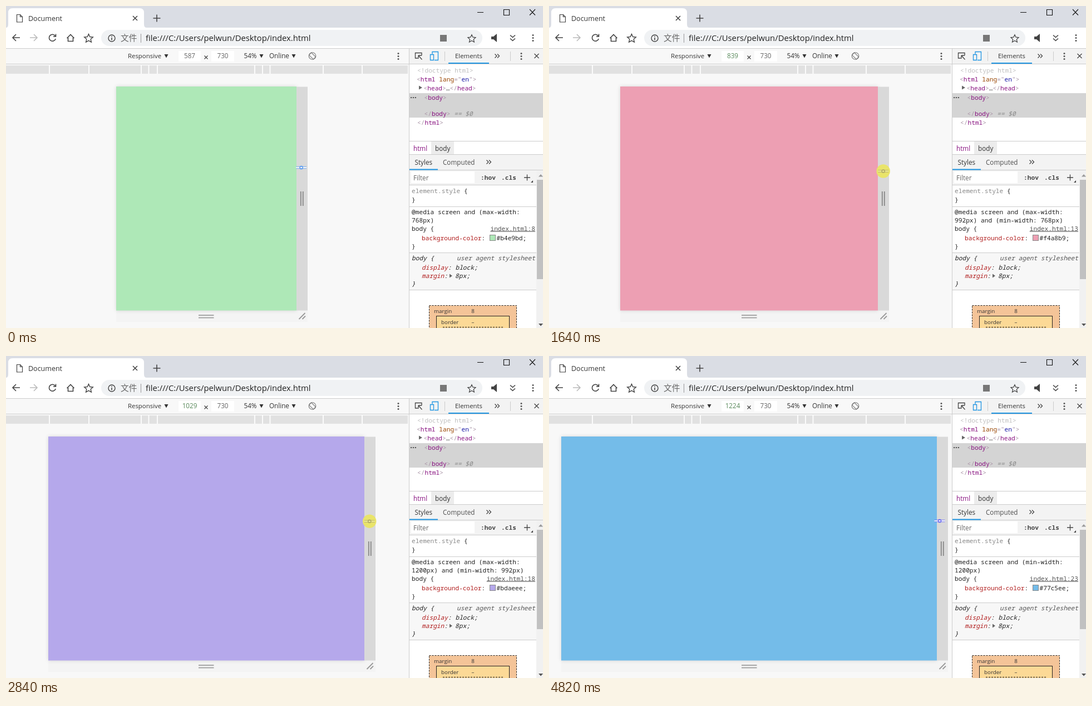
Write an HTML page that moves like this. It is 965 px wide and 580 px high and loops after 4940 ms.

```html
<!DOCTYPE html>
<html lang="en">
<head>
<meta charset="utf-8">
<title>Responsive preview</title>
<style>
html, body { margin: 0; width: 100%; height: 100%; overflow: hidden; background: #fff; }
svg { display: block; width: 965px; height: 580px; }
text { font: 11.7px "Open Sans", sans-serif; fill: #333; white-space: pre; }
.mono text { font: 11.2px "Noto Sans Mono", monospace; fill: #222; }
.mono .bracket { fill: #a894a6; }
.mono .tag { fill: #881280; }
.mono .prop { fill: #b01c1c; }
.mono .dim { fill: #888; }
.mono .ua text { font-style: italic; }
.mono .bold { font-weight: bold; fill: #444; }
.mono .link { text-anchor: end; text-decoration: underline; fill: #555; }
.small text { font-size: 9.8px; }
.mid { text-anchor: middle; }
.line { fill: none; stroke: #444; stroke-width: 1.6; }
.rule { fill: none; stroke: #ccc; }
</style>
</head>
<body>
<svg viewBox="0 0 965 580">
  <!-- window frame and tab -->
  <rect width="965" height="39" fill="#dadde4"/>
  <path d="M0 39q4 0 4-6V12q0-8 8-8H240q8 0 8 8V33q0 6 5 6z" fill="#fff"/>
  <text x="40" y="27" style="font-size:12.5px">Document</text>
  <path class="line" style="stroke-width:1.2" d="M19.500 15.500h6l4 4v9.500h-10zM25.500 15.500v4h4"/>
  <path class="line" d="M228 18l8 8m0-8l-8 8M264.500 22h13m-6.500-6.500v13"/>
  <path class="line" style="stroke:#111;stroke-width:1.1" d="M847 11.500h11M894.500 6.500h10v10h-10zM941 6l10 10.500m0-10.500l-10 10.500"/>

  <!-- address bar -->
  <rect y="39" width="965" height="37" fill="#fff"/>
  <rect x="171" y="43" width="685" height="29" rx="14.500" fill="#f0f2f4"/>
  <g class="line">
    <path d="M25 57H12m6-6l-6 6 6 6"/>
    <path d="M43 57h13m-6-6l6 6-6 6" stroke="#bbb"/>
    <path d="M88.500 54a6 6 0 1 0 .7 5M89.500 50.500v4.500h-4.500"/>
    <path d="M109.500 58l6.500-6.500 6.500 6.500M111.500 57v6.500h9V57"/>
    <path id="star" d="M148.500 50.500l2.300 5 5.500.6-4.100 3.700 1.200 5.400-4.900-2.800-4.900 2.800 1.200-5.400-4.100-3.700 5.500-.6z" stroke-width="1.4"/>
    <use href="#star" transform="translate(703.300 6.300) scale(.9)"/>
    <circle cx="190" cy="58" r="6" stroke-width="1.4"/>
    <path d="M190 57v4.500M190 54v1.600"/>
    <path d="M242.500 50v16" stroke="#999" stroke-width="1"/>
    <path d="M906 52.500l4.500 4 4.500-4M906 58.500l4.500 4 4.500-4"/>
  </g>
  <rect x="780" y="52" width="12" height="12" fill="#777"/>
  <path d="M872 55h4l6-5v15l-6-5h-4z" fill="#444"/>
  <text x="206" y="63" style="font:14.7px 'Noto Sans CJK SC','Noto Sans CJK',sans-serif;fill:#666">文件</text>
  <text x="251" y="63" style="font-size:14.8px;fill:#222">file:///C:/Users/pelwun/Desktop/index.html</text>

  <!-- device toolbar and ruler -->
  <rect y="76" width="965" height="504" fill="#f8f8f8"/>
  <path d="M310 81h40v19h-40zM369 81h41v19h-41z" fill="#fff"/>
  <text x="219" y="94" style="font-size:11.4px">Responsive</text>
  <text class="mid" id="size" x="330" y="94"></text>
  <text class="mid" x="389.500" y="94" fill-opacity=".75">730</text>
  <text x="427.500" y="94">54%</text>
  <text x="473" y="94">Online</text>
  <path d="M284.500 87h7l-3.500 6.500zM455.500 87h7l-3.500 6.500zM513.500 87h7l-3.500 6.500z" fill="#333"/>
  <path class="line" style="stroke-width:1.2" d="M356.500 89.500l6 6m0-6l-6 6"/>
  <g class="line" style="stroke:#777;stroke-width:1.1">
    <circle cx="550.500" cy="90" r="6.300"/>
    <rect x="547.500" y="84.500" width="6" height="11" transform="rotate(-45 550.500 90)"/>
  </g>
  <path class="rule" d="M0 104.500H724"/>
  <path d="M0 107H722V122H0z" fill="#e1e1e1"/>
  <path d="M78 107v15m71-15v15m94-15v15m13.500-15v15m15.500-15v15m175-15v15m14-15v15m13.500-15v15m95.500-15v15m70-15v15" stroke="#fbfbfb" stroke-width="2"/>

  <!-- resizable device -->
  <rect id="foot" y="548" height="21" fill="#f4f4f4"/>
  <rect id="page" y="145" height="403.500" style="filter:drop-shadow(0 0 3px #0002)"/>
  <g id="grip">
    <path d="M0 145.500h20v403H0z" fill="#d9d9d9"/>
    <path d="M7.800 334v26M11.800 334v26" stroke="#888" stroke-width="1.8"/>
    <path d="M4.500 564l11-11M10.500 564l5.500-5.500" stroke="#999" stroke-width="1.8"/>
  </g>
  <path d="M346 557h27.500M346 561.500h27.500" stroke="#a5a5a5" stroke-width="1.8"/>

  <!-- inspector -->
  <path d="M725 77H965V580H725z" fill="#fff"/>
  <path d="M725 77H965V104H725zM725 268H965V322H725z" fill="#f3f3f3"/>
  <path d="M725 157H965V201H725z" fill="#d4d4d4"/>
  <path d="M764 244h41v23h-41z" fill="#ececec"/>
  <path d="M728 298h114v21H728z" fill="#fff"/>
  <path d="M725 445H953V511H725z" fill="#f7f7f7"/>
  <path class="rule" d="M0 76.500H965M724.500 77V580M725 104.500H965M725 243.500H965M725 267.500H965M725 295.500H965M725 322.500H953M725 361.500H953M725 444.500H953M725 511.500H953M788.500 82v17M906.500 82v17"/>
  <path d="M795 103h73M725 294.500h51" stroke="#2196e3" stroke-width="2"/>
  <g class="line" style="stroke-width:1.3">
    <path d="M740 94h-4.500V84.500h11.500V89M741 89l6.500 7.500M741 89v6m0-6h6"/>
    <path d="M766 86.500v-4h10.500v15H770M762.500 87.500h6v10h-6z" stroke="#2196e3"/>
    <path d="M878.500 86.500l3.500 3.500-3.500 3.500m4.500-7l3.500 3.500-3.500 3.500M863.500 277.500l3.500 3.500-3.500 3.500m4.500-7l3.500 3.500-3.500 3.500"/>
    <path d="M949.500 86l8 8m0-8l-8 8M931 309h11m-5.500-5.500v11"/>
  </g>
  <path d="M947 314v4h-4z" fill="#444"/>
  <path d="M742 143.500l6 3.500-6 3.500zM797 482.500l5 3.500-5 3.500z" fill="#666"/>
  <g id="dots" fill="#555"><circle cx="947" cy="52.500" r="1.500"/><circle cx="947" cy="57.500" r="1.500"/><circle cx="947" cy="62.500" r="1.500"/></g>
  <use href="#dots" x="-242" y="33"/>
  <use href="#dots" x="-21" y="33"/>
  <path d="M727 165h10" stroke="#555" stroke-width="2" stroke-dasharray="2.2 1.7"/>
  <text x="807" y="94" style="font-size:11.4px">Elements</text>
  <text x="732" y="260.500" style="fill:#881280">html</text>
  <text x="771" y="260.500">body</text>
  <text x="734.500" y="285.500">Styles</text>
  <text x="785" y="285.500" fill-opacity=".85">Computed</text>
  <text x="732" y="313.500" fill-opacity=".75">Filter</text>

  <g class="mono">
    <text x="739" y="119.500" style="fill:#c0c0c0">&lt;!doctype html&gt;</text>
    <text class="bracket" x="738" y="136">&lt;<tspan class="tag">html</tspan> <tspan fill="#994500">lang</tspan>="<tspan fill="#1a1aa6">en</tspan>"&gt;</text>
    <text class="bracket" x="750.500" y="152">&lt;<tspan class="tag">head</tspan>&gt;<tspan fill="#333">…</tspan>&lt;/<tspan class="tag">head</tspan>&gt;</text>
    <text class="bracket" x="751.500" y="168.500">&lt;<tspan class="tag">body</tspan>&gt;</text>
    <text class="bracket" x="751.500" y="198">&lt;/<tspan class="tag">body</tspan>&gt;<tspan fill="#888" font-style="italic"> == $0</tspan></text>
    <text class="bracket" x="739" y="214">&lt;/<tspan class="tag">html</tspan>&gt;</text>
    <text class="bold" x="853" y="313">:hov</text>
    <text class="bold" x="890" y="313">.cls</text>
    <text x="729" y="337"><tspan class="dim">element.style</tspan> {</text>
    <text x="729" y="353">}</text>
    <text x="729" y="375" id="media"></text>
    <text x="729" y="389.500" id="range"></text>
    <text x="729" y="404.500">body {</text>
    <text class="link" x="951" y="404.500" id="link"></text>
    <text x="747" y="421.500"><tspan class="prop">background-color</tspan>:</text>
    <rect id="swatch" x="869.500" y="412.500" width="10" height="10" stroke="#888"/>
    <text x="881.500" y="421.500" id="hex"></text>
    <text x="729" y="436.500">}</text>
    <g class="ua">
      <text x="729" y="458">body {</text>
      <text x="951" y="458" text-anchor="end" style="fill:#555">user agent stylesheet</text>
      <text x="747" y="474.500"><tspan class="prop">display</tspan>: block;</text>
      <text x="747" y="489.500"><tspan class="prop">margin</tspan>:</text>
      <text x="807" y="489.500">8px;</text>
      <text x="729" y="503.500">}</text>
    </g>
  </g>

  <!-- box model and scrollbar -->
  <g class="small">
    <rect x="760.500" y="539.500" width="157" height="60" fill="#f4c498" stroke="#222" stroke-dasharray="3 2"/>
    <rect x="773.500" y="558.500" width="131" height="40" fill="#fcd996" stroke="#222"/>
    <path d="M785 578.500h108" stroke="#222" stroke-dasharray="3 2"/>
    <text x="769" y="552.500">margin</text><text class="mid" x="839" y="552.500">8</text>
    <text x="782" y="572.500">border</text><text class="mid" x="839" y="572.500">–</text>
  </g>
  <path d="M953 296h12v284h-12z" fill="#f1f1f1"/>
  <path d="M954 313h11v179h-11z" fill="#c1c1c1"/>
  <path d="M957 307.500l4-4.500 4 4.500z" fill="#999"/>
  <path d="M957 572l4 4.500 4-4.500z" fill="#555"/>

  <!-- pointer -->
  <g id="pointer">
    <circle id="press" r="12.200" fill="#e9e46a"/>
    <path id="bar" d="M-9.500 -1.500h19v3h-19z" fill="#fff"/>
    <g id="cursor" fill="none"><path d="M-9.500 -1.700h19M-9.500 1.700h19" stroke-width=".8"/><circle r="2.600" stroke-width="1.5"/></g>
  </g>
</svg>
<script>
const el = id => document.getElementById(id);
const set = (id, attrs) => { for (const a in attrs) el(id).setAttribute(a, attrs[a]); };

const LOOP = 4940, START = 430, STEP = 109.7;

// [step, value] pairs
const WIDTH = [[-1, 587], [4, 646], [9, 799], [11, 839], [14, 897], [18, 991], [19, 1007],
  [24, 1062], [28, 1135], [29, 1149], [33, 1202], [34, 1215], [36, 1224]];
const LAG = [[-1, -.5], [4, 3.5], [9, 0], [33, .3], [36, -.9], [38, -.9], [40, -4.9]];
const MOUSE_Y = [[-1, 291], [4, 295], [11, 297.5], [33, 298], [36, 299], [38, 299], [40, 297]];

const RULES = [
  { min: 0, fill: '#aee8b7', hex: '#b4e9bd', limit: 'max', range: '768px)', line: 8 },
  { min: 768, fill: '#ed9fb3', hex: '#f4a8b9', limit: 'max', range: '992px) and (min-width: 768px)', line: 13 },
  { min: 992, fill: '#b5a8eb', hex: '#bdaeee', limit: 'max', range: '1200px) and (min-width: 992px)', line: 18 },
  { min: 1200, fill: '#74bce9', hex: '#77c5ee', limit: 'min', range: '1200px)', line: 23 }
];

function at(keys, k) {
  const i = keys.findIndex(([step]) => step >= k);
  if (i < 0) return keys[keys.length - 1][1];
  if (i === 0) return keys[0][1];
  const [k0, v0] = keys[i - 1], [k1, v1] = keys[i];
  return v0 + (v1 - v0) * (k - k0) / (k1 - k0);
}

const ruleAt = k => RULES.filter(r => at(WIDTH, k) >= r.min).pop();

function draw(k) {
  const width = at(WIDTH, k), half = width * .276;
  const left = Math.round(359.6 - half), right = Math.round(359.6 + half);
  set('page', { x: left, width: right - left, fill: ruleAt(k).fill });
  set('foot', { x: left, width: right - left + 20 });
  set('grip', { transform: `translate(${right})` });
  el('size').textContent = Math.round(width);
  el('size').style.fill = k < 0 ? '#666' : '#5a8a5c';

  // the style pane refreshes one step after the page
  const rule = ruleAt(k - 1);
  el('media').textContent = `@media screen and (${rule.limit}-width:`;
  el('range').textContent = rule.range;
  el('link').textContent = `index.html:${rule.line}`;
  el('hex').textContent = rule.hex + ';';
  set('swatch', { fill: rule.fill });

  const pressed = k >= 0 && k < 39;
  set('pointer', { transform: `translate(${369.1 + half + at(LAG, k)} ${at(MOUSE_Y, k)})` });
  set('press', { opacity: pressed ? (k === 38 ? .5 : 1) : 0 });
  set('bar', { opacity: pressed ? .25 : .75 });
  set('cursor', { stroke: pressed ? '#b0aa68' : k < 0 ? '#5c9cf0' : '#6a6cf5' });
}

function tick() {
  const t = performance.now() % LOOP;
  draw(Math.max(-1, Math.floor((t - START) / STEP)));
  requestAnimationFrame(tick);
}
tick();
</script>
</body>
</html>
```
